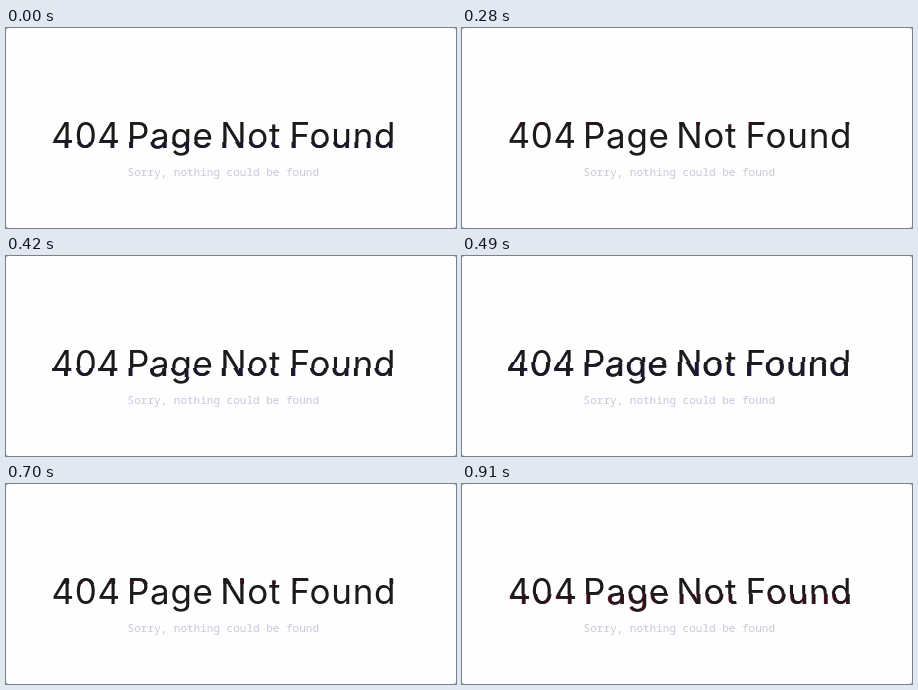
Animation, 450 px wide and 200 px high, one loop 980 ms. Source, as an HTML page:

```html
<!DOCTYPE html>
<html lang="en">
<head>
<meta charset="utf-8">
<title>404 Page Not Found</title>
<style>
  html, body { margin: 0; width: 100%; height: 100%; overflow: hidden; background: #fff; }
  svg { display: block; width: 450px; height: 200px; }
  .title {
    font: 400 35px Inter, "Liberation Sans", sans-serif;
    font-optical-sizing: none;
    letter-spacing: .7px;
  }
  .note { font: 500 11px "Noto Sans Mono", "DejaVu Sans Mono", monospace; }
</style>
</head>
<body>
<svg viewBox="0 0 450 200" id="stage">
  <defs>
    <g id="title" class="title">
      <text y="120"><tspan x="45.4">404</tspan><tspan x="121">Page</tspan><tspan x="214.2">Not</tspan><tspan x="283.6">Found</tspan></text>
    </g>
  </defs>
  <rect width="450" height="200" fill="#a9a9a9"/>
  <rect width="450" height="200" rx="3" fill="#fefefe"/>
  <use href="#title" fill="#1b1b1d"/>
  <g id="slices"></g>
  <text class="note" x="121.6" y="148.2" fill="#c9c5e3">Sorry, nothing could be found</text>
</svg>
<script>
const LOOP = 980;
const STEP = 70;
const INK = '#1b1b1d';

// A band of the heading pushed sideways, with a coloured fringe on one edge.
const left = (y, height, shift = 1.5) => ({ y, height, shift: -shift, tint: '#25108a', fringe: 0.8 });
const right = (y, height, shift = 1) => ({ y, height, shift, tint: '#8a1020', fringe: -0.7 });

// Keyed by step; other steps are clean.
const glitches = {
  0: [left(114, 7, 1)],
  1: [left(120, 8, 0.6)],
  3: [right(97, 5, 0.5)],
  4: [right(93, 4, 0.5)],
  6: [left(112, 9)],
  7: [left(106, 15)],
  8: [left(101, 7, 0.8)],
  10: [right(95, 5, 0.5)],
  13: [right(110, 18)]
};

const SVG_NS = 'http://www.w3.org/2000/svg';
const layer = document.getElementById('slices');

function add(parent, name, attributes) {
  const node = document.createElementNS(SVG_NS, name);
  for (const [key, value] of Object.entries(attributes)) node.setAttribute(key, value);
  return parent.appendChild(node);
}

function drawSlice({ y, height, shift, tint, fringe }, index) {
  const box = { x: 30, y, width: 390, height };
  const id = `band${index}`;
  add(add(layer, 'clipPath', { id }), 'rect', box);
  const group = add(layer, 'g', { 'clip-path': `url(#${id})` });
  add(group, 'rect', { ...box, fill: '#fefefe' });
  add(group, 'use', { href: '#title', x: shift + fringe, fill: tint });
  add(group, 'use', { href: '#title', x: shift, fill: INK });
}

let shown = -1;

function render(time) {
  const step = Math.floor((time % LOOP) / STEP);
  if (step === shown) return;
  shown = step;
  layer.replaceChildren();
  (glitches[step] || []).forEach(drawSlice);
}

const start = performance.now();
function tick() {
  render(performance.now() - start);
  requestAnimationFrame(tick);
}
tick();
</script>
</body>
</html>
```
